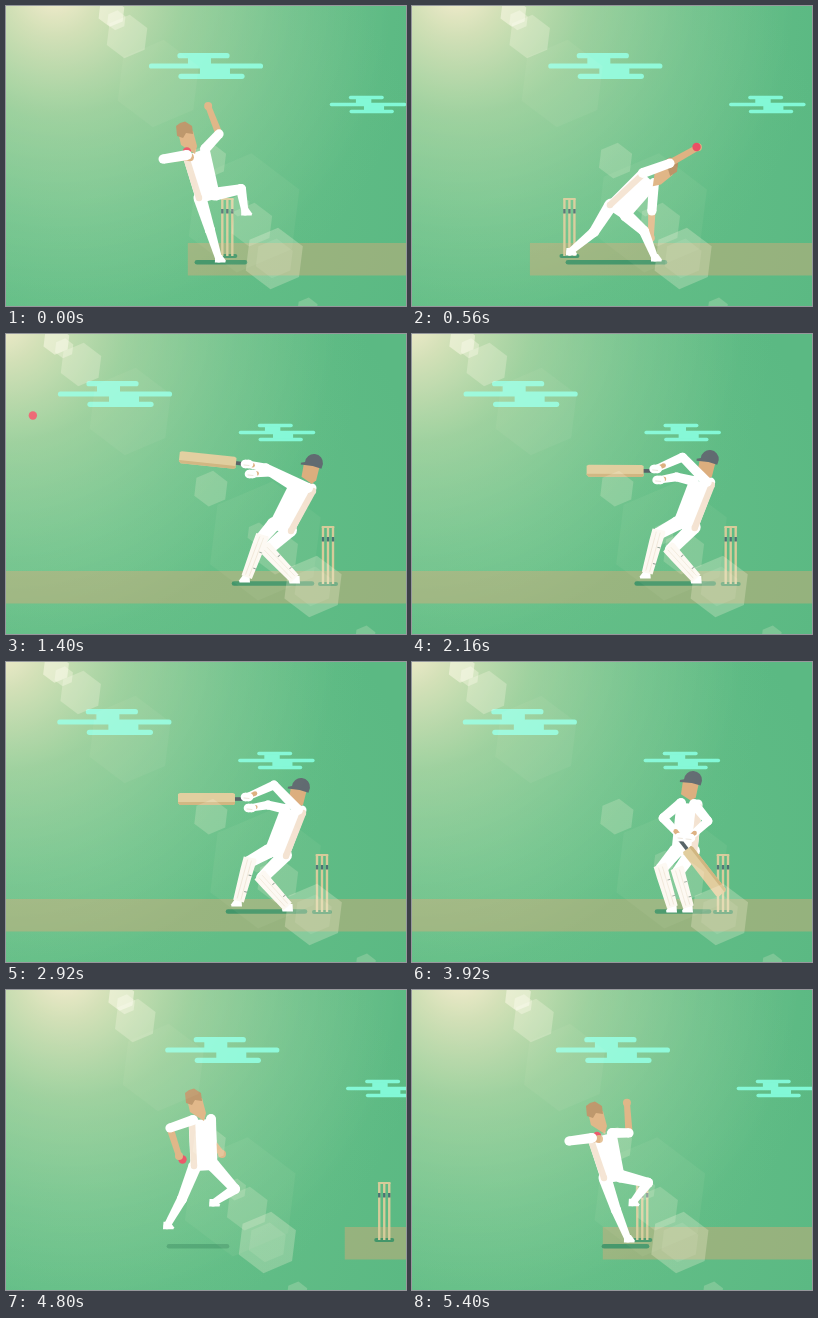
These frames come from a looping animation (400x300 px, 5440 ms). An HTML page with a canvas:

```html
<!DOCTYPE html>
<html lang="en">
<head>
<meta charset="utf-8">
<title>Cricket</title>
<style>
html, body { margin: 0; width: 100%; height: 100%; overflow: hidden; background: #66bf8e; }
canvas { display: block; width: 400px; height: 300px; }
</style>
</head>
<body>
<canvas id="stage"></canvas>
<script>
const LOOP = 5440, RELEASE = 560, HIT = 1250;
const SKIN = '#dcae7e', WHITE = '#ffffff', SHADE = '#f3e2d0', SHADOW = '#43966a';
const canvas = document.getElementById('stage');
const g = canvas.getContext('2d');
const scale = Math.max(1, window.devicePixelRatio || 1);
canvas.width = 400 * scale;
canvas.height = 300 * scale;

// Smooth curve through [time, values] keys, without overshoot.
function curve(keys) {
  const slope = (i, n) => (keys[i + 1][1][n] - keys[i][1][n]) / (keys[i + 1][0] - keys[i][0]);
  const last = keys.length - 1;
  function tangent(i, n) {
    if (i === 0) return slope(0, n);
    if (i === last) return slope(last - 1, n);
    const a = slope(i - 1, n), b = slope(i, n);
    return a * b <= 0 ? 0 : 2 * a * b / (a + b);
  }
  return t => {
    let i = 0;
    while (i < last - 1 && t >= keys[i + 1][0]) i++;
    const [t0, a] = keys[i], [t1, b] = keys[i + 1];
    const h = t1 - t0, u = Math.min(1, Math.max(0, (t - t0) / h)), w = 1 - u;
    return a.map((v, n) =>
      v * (1 + 2 * u) * w * w + b[n] * u * u * (3 - 2 * u) +
      h * u * w * (w * tangent(i, n) - u * tangent(i + 1, n)));
  };
}

function poses(keys) {
  const parts = Object.keys(keys[0][1]);
  const curves = parts.map(p => curve(keys.map(([t, pose]) => [t, pose[p]])));
  return t => Object.fromEntries(parts.map((p, i) => [p, curves[i](t)]));
}

// Screen x of the left end of the pitch.
const pitchX = curve([
  [0, 182], [200, 145], [400, 125], [560, 118], [700, 50], [900, -340], [1100, -645],
  [1240, -691], [1400, -693], [2920, -699], [3920, -704], [4080, -600], [4250, 0],
  [4400, 360], [4520, 412], [4800, 339], [5400, 191], [5440, 182]
].map(([t, x]) => [t, [x]]));

// Bowler; shadow is left, right, strength.
const strideA = {
  head: [187, 107], turn: [0], sh: [187, 130, 205, 129], hip: [189, 176, 207, 175],
  armA: [164, 138, 173, 166], armB: [206, 152, 216, 164],
  legA: [176, 209, 161, 236], legB: [229, 199, 207, 213],
  ball: [176.5, 169.5], shadow: [163, 221, .6]
};
const passA = {
  ...strideA, head: [187, 110], sh: [187, 133, 205, 132], hip: [189, 179, 207, 178],
  armA: [172, 153, 186, 175], armB: [209, 156, 220, 166],
  legA: [205, 214, 168, 218], legB: [212, 218, 212, 251], ball: [190, 177],
  shadow: [168, 220, 1]
};
const strideB = {
  ...strideA, armA: [176, 156, 203, 163], armB: [214, 153, 203, 168],
  legA: strideA.legB, legB: strideA.legA, ball: [206, 165]
};
const passB = { ...passA, legA: passA.legB, legB: passA.legA };
const plant = {
  ...strideA, head: [184, 115], sh: [181, 140, 203, 137], hip: [193, 187, 208, 186],
  armA: [160, 148, 182, 160], armB: [216, 150, 218, 136],
  legA: [219, 222, 239, 249], legB: [210, 220, 182, 232],
  ball: [182, 156], shadow: [192, 238, 1]
};
const gather = {
  head: [182, 120], turn: [0], sh: [180, 148, 200, 143], hip: [193, 188, 208, 186],
  armA: [157, 151, 187, 149], armB: [217, 143, 215, 113],
  legA: [204, 220, 216, 249], legB: [236, 193, 220, 213],
  ball: [185, 146], shadow: [192, 235, 1]
};
const leap = {
  head: [178, 124], turn: [0], sh: [181, 149, 199, 143], hip: [194, 192, 209, 188],
  armA: [157, 153, 184, 151], armB: [213, 128, 202, 100],
  legA: [204, 224, 213, 253], legB: [235, 183, 239, 206],
  ball: [181, 145], shadow: [191, 239, 1]
};
const drop = {
  head: [186, 124], turn: [4], sh: [184, 150, 204, 145], hip: [193, 195, 210, 193],
  armA: [169, 168, 168, 194], armB: [220, 124, 222, 97],
  legA: [195, 225, 187, 251], legB: [237, 193, 254, 222],
  ball: [168, 198], shadow: [180, 246, 1]
};
const windup = {
  head: [205, 126], turn: [12], sh: [198, 149, 218, 152], hip: [194, 197, 212, 201],
  armA: [177, 149, 155, 135], armB: [239, 148, 255, 162],
  legA: [186, 226, 167, 247], legB: [233, 218, 250, 252],
  ball: [151, 132], shadow: [162, 250, 1]
};
const over = {
  head: [232, 138], turn: [32], sh: [214, 153, 231, 162], hip: [197, 199, 213, 207],
  armA: [215, 124, 224, 97], armB: [245, 181, 248, 206],
  legA: [183, 228, 160, 246], legB: [232, 225, 247, 252],
  ball: [225, 93], shadow: [157, 252, 1]
};
const release = {
  head: [258, 160], turn: [65], sh: [231, 167, 242, 177], hip: [199, 199, 214, 209],
  armA: [258, 157, 286, 141], armB: [240, 205, 239, 232],
  legA: [182, 226, 158, 246], legB: [232, 225, 243, 252],
  ball: [283.5, 141], shadow: [156, 253, 1]
};
const follow = {
  ...release, head: [261, 170], turn: [80], sh: [232, 173, 242, 184],
  armA: [260, 186, 258, 213], armB: [226, 207, 216, 224]
};
const bowlerAt = poses([
  [0, leap], [140, drop], [300, windup], [430, over], [RELEASE, release], [740, follow],
  [3800, strideB], [4080, strideB], [4200, passB], [4320, strideA], [4440, passA],
  [4560, strideB], [4680, passB], [4800, strideA], [4920, passA], [5040, strideB],
  [5160, passB], [5290, plant], [5400, gather], [LOOP, leap]
]);

// Batter; coordinates hold when his wicket is at x = 316.
const ready = {
  head: [285, 122], turn: [0], sh: [273, 143, 293, 144], hip: [267, 189, 284, 190],
  armA: [271, 161, 290, 152], armB: [307, 157, 295, 144],
  legA: [246, 211, 244, 246], legB: [277, 214, 284, 247],
  bat: [298, 136, -65], shadow: [228, 303, 1]
};
const strike = {
  head: [289, 127], turn: [-3], sh: [272, 147, 294, 149], hip: [262, 192, 280, 196],
  armA: [258, 162, 246, 176], armB: [265, 164, 249, 172],
  legA: [247, 206, 233, 246], legB: [260, 216, 284, 247],
  bat: [239, 181, 135], shadow: [222, 300, 1]
};
const finish = {
  head: [302, 129], turn: [6], sh: [281, 152, 300, 154], hip: [262, 190, 278, 196],
  armA: [258, 138, 239, 140], armB: [254, 134, 235, 130],
  legA: [249, 205, 234, 245], legB: [255, 216, 284, 246],
  bat: [224, 129, 186], shadow: [222, 300, 1]
};
const hold = {
  head: [295, 125], turn: [6], sh: [279, 147, 296, 148], hip: [263, 189, 279, 193],
  armA: [262, 143, 244, 146], armB: [268, 123, 241, 135],
  legA: [243, 200, 232, 241], legB: [256, 216, 283, 246],
  bat: [229, 137, 180], shadow: [222, 299, 1]
};
const rest = {
  head: [286, 118], turn: [4], sh: [274, 141, 291, 142], hip: [269, 189, 286, 189],
  armA: [256, 156, 274, 175], armB: [301, 159, 282, 176],
  legA: [254, 207, 266, 247], legB: [271, 210, 282, 247],
  bat: [280, 187, 52], shadow: [250, 302, 1]
};
const batterAt = poses([
  [0, ready], [1100, ready], [HIT, strike], [1400, finish], [1560, finish],
  [2200, hold], [3000, hold], [3640, rest], [LOOP, rest]
]);

// Drawing helpers
function poly(color, ...p) {
  g.fillStyle = color;
  g.beginPath();
  for (let i = 0; i < p.length; i += 2) g.lineTo(p[i], p[i + 1]);
  g.closePath();
  g.fill();
}
function disc(color, x, y, r) {
  g.fillStyle = color;
  g.beginPath();
  g.arc(x, y, r, 0, 7);
  g.fill();
}
function line(color, width, x0, y0, x1, y1, cap = 'round') {
  g.strokeStyle = color;
  g.lineWidth = width;
  g.lineCap = cap;
  g.beginPath();
  g.moveTo(x0, y0);
  g.lineTo(x1, y1);
  g.stroke();
}
// Tapered limb with round ends.
function limb(color, x0, y0, r0, x1, y1, r1) {
  const a = Math.atan2(y1 - y0, x1 - x0) + Math.PI / 2;
  const c = Math.cos(a), s = Math.sin(a);
  poly(color, x0 + c * r0, y0 + s * r0, x1 + c * r1, y1 + s * r1,
    x1 - c * r1, y1 - s * r1, x0 - c * r0, y0 - s * r0);
  disc(color, x0, y0, r0);
  disc(color, x1, y1, r1);
}
function at(x, y, degrees, draw) {
  g.save();
  g.translate(x, y);
  g.rotate(degrees * Math.PI / 180);
  draw();
  g.restore();
}

function hexagon(x, y, r, alpha) {
  const p = [];
  for (let i = 0; i < 6; i++) {
    const a = -.4 + i * Math.PI / 3;
    p.push(x + r * Math.cos(a), y + r * Math.sin(a));
  }
  poly(`rgba(255,226,184,${alpha})`, ...p);
}

function glow(x, y, r, stops) {
  const fill = g.createRadialGradient(x, y, 0, x, y, r);
  stops.forEach(([p, c]) => fill.addColorStop(p, c));
  g.fillStyle = fill;
  g.fillRect(0, 0, 400, 300);
}

function background(sun) {
  g.fillStyle = '#5bb983';
  g.fillRect(0, 0, 400, 300);
  glow(90, 190, 330, [[0, 'rgba(112,198,142,.6)'], [1, 'rgba(112,198,142,0)']]);
  glow(sun - 55, -18, 370, [
    [0, 'rgba(244,230,194,1)'], [.13, 'rgba(216,220,174,.8)'],
    [.35, 'rgba(164,208,152,.55)'], [.65, 'rgba(132,202,146,.28)'],
    [1, 'rgba(120,200,142,0)']]);
}

// Light that brightens everything below it.
function sunlight(sun) {
  g.globalCompositeOperation = 'screen';
  glow(sun - 45, -18, 330, [
    [0, 'rgba(255,222,170,.34)'], [.4, 'rgba(255,222,170,.19)'], [1, 'rgba(255,222,170,0)']]);
  const cx = 201, cy = 151, dx = cx - sun, dy = cy - 4;
  const spots = [[-.5, 44, .05], [.38, 60, .05], [-.98, 14, .5], [-.93, 10, .36], [-.82, 22, .27],
    [.025, 18, .2], [.33, 11, .17], [.46, 22, .18], [.69, 31, .26], [.69, 20, .1], [1.03, 11, .2]];
  for (const [k, r, a] of spots) hexagon(cx + k * dx, cy + k * dy, r, a);
  g.globalCompositeOperation = 'source-over';
}

function cloud(x, y, s) {
  g.save();
  g.translate(x, y);
  g.scale(s, s);
  const c = '#82f8d6';
  line(c, 5.2, -26, -10.3, 21, -10.3);
  line(c, 5.2, -54.5, 0, 54.5, 0);
  line(c, 5.2, -25, 10.3, 36, 10.3);
  g.fillStyle = c;
  g.fillRect(-18, -9, 23, 8);
  g.fillRect(-6, 1, 30, 8);
  g.restore();
}

function wicket(x) {
  line(SHADOW, 4, x - 8, 250, x + 8, 250);
  for (const d of [-5, 0, 5]) {
    line('#d6cb9a', 2.4, x + d, 193, x + d, 250, 'butt');
    line('#4c7272', 2.4, x + d, 203, x + d, 207.5, 'butt');
  }
  line('#d6cb9a', 2, x - 5.5, 193, x + 5.5, 193);
}

function groundShadow(y, [x0, x1, strength]) {
  g.globalAlpha = strength;
  line(SHADOW, 4.6, x0, y, x1, y);
  g.globalAlpha = 1;
}

function torso(p, shadeRight) {
  const [ax, ay, bx, by] = p.sh, [cx, cy, dx, dy] = p.hip;
  poly(WHITE, ax, ay, bx, by, dx, dy, cx, cy);
  limb(WHITE, ax, ay, 4.5, cx, cy, 4.5);
  limb(WHITE, bx, by, 4.5, dx, dy, 4.5);
  limb(WHITE, cx, cy, 5, dx, dy, 5);
  if (shadeRight) limb(SHADE, bx + 1, by + 3, 3.2, dx + 1, dy + 1, 3.2);
  else limb(SHADE, ax - 1, ay + 2, 3.2, cx - 1, cy, 3.2);
}

function shoe(x, y, dir) {
  poly(WHITE, x - 3.5 * dir, y - 4, x + 3 * dir, y - 4, x + 7 * dir, y + 1.5,
    x + 6.5 * dir, y + 3.5, x - 4 * dir, y + 3.5);
}

function bowlerLeg(x, y, [kx, ky, fx, fy]) {
  limb(WHITE, x, y, 6.5, kx, ky, 5);
  limb(WHITE, kx, ky, 5, fx, fy, 3.4);
  shoe(fx, fy, 1);
}

function bowlerArm(x, y, [ex, ey, hx, hy]) {
  limb(SKIN, ex, ey, 3.6, hx, hy, 3);
  disc(SKIN, hx, hy, 4);
  limb(WHITE, x, y, 5, ex, ey, 4.6);
}

function ball(x, y) {
  disc('#e9485f', x, y, 4.2);
}

function bowler(p, holding) {
  const [ax, ay, bx, by] = p.sh, [cx, cy, dx, dy] = p.hip;
  groundShadow(256.3, p.shadow);
  bowlerArm(bx, by, p.armB);
  bowlerLeg(dx, dy, p.legB);
  bowlerLeg(cx, cy, p.legA);
  torso(p, false);
  at(...p.head, p.turn[0], () => {
    poly(SKIN, -6, 2, 9, 1, 13, 16, 11, 24, -3, 15);
    poly('#b48a5e', -8, -4, -4, -7, 1, -8.5, 8, -4, 9, 4, 2, 3, -1, 8, -7, 6);
  });
  if (holding) ball(...p.ball);
  bowlerArm(ax, ay, p.armA);
  if (holding && p.turn[0] > 20) ball(...p.ball);
}

function batterLeg(x, y, [kx, ky, fx, fy]) {
  limb(WHITE, x, y, 7, kx, ky, 6);
  shoe(fx, fy, -1);
  const a = Math.atan2(fy - ky, fx - kx), len = Math.hypot(fx - kx, fy - ky);
  at(kx, ky, a * 180 / Math.PI, () => {
    poly('#fcf8f0', -5, -6, -3, -7, 8, -6.5, len - 2, -5.5, len - 2, 5.5, 8, 6.5, -4, 6.5);
    for (const d of [-2, 2]) line('#eee4d6', .8, -2, d, len - 4, d, 'butt');
    for (const k of [.3, .7]) line('#8b9a91', 1, len * k, -6, len * k, -3, 'butt');
  });
}

function batterArm(x, y, [ex, ey, hx, hy]) {
  limb(WHITE, x, y, 5, ex, ey, 4.4);
  limb(WHITE, ex, ey, 4.4, hx, hy, 3.6);
  const mx = hx + (ex - hx) * .3, my = hy + (ey - hy) * .3;
  limb(SKIN, mx, my, 2.2, hx, hy, 2.2);
}

function bat([x, y, angle]) {
  at(x, y, angle, () => {
    line('#4f5c62', 3.6, -16, 0, 1, 0, 'butt');
    poly('#dfcb9a', 0, -5, 2, -6, 55, -6, 57, -4, 57, 5, 55, 6, 2, 6, 0, 5);
    poly('#cdb27c', 0, -5, 2, -6, 55, -6, 57, -4, 57, -3, 0, -3);
  });
}

function batter(p) {
  const [ax, ay, bx, by] = p.sh, [cx, cy, dx, dy] = p.hip;
  groundShadow(249.5, p.shadow);
  batterLeg(dx, dy, p.legB);
  batterLeg(cx, cy, p.legA);
  torso(p, true);
  at(...p.head, p.turn[0], () => {
    poly(SKIN, -10, 2, 6, 3, 4, 17, 0, 21, -11, 15);
    g.fillStyle = '#616b71';
    g.beginPath();
    g.arc(0, 0, 9, Math.PI, 0);
    g.lineTo(8, 5);
    g.lineTo(-1, 3);
    g.lineTo(-13, 3);
    g.lineTo(-13, 1);
    g.lineTo(-9, 0);
    g.fill();
  });
  batterArm(bx - 4, by, p.armB);
  batterArm(ax, ay, p.armA);
  bat(p.bat);
  for (const [, , x, y] of [p.armA, p.armB]) {
    limb(WHITE, x - 2, y, 4.3, x + 2, y, 4.3);
    line('#e6ddd0', .8, x - 3, y + 1, x + 2, y + 1.5);
  }
}

function flyingBall(t, px) {
  const bounce = 1050;
  if (t < RELEASE || t > 1450) return;
  if (t < bounce) {
    const u = (t - RELEASE) / (bounce - RELEASE);
    ball(px + 165.5 + 560 * u, 141 + 30 * u + 70 * u * u);
  } else if (t < HIT) {
    const u = (t - bounce) / (HIT - bounce);
    ball(px + 725.5 + 165 * u, 241 - 75 * u + 15 * u * u);
  } else {
    const u = (t - HIT) / 150;
    ball(199 - 171 * u, 181 - 112 * u + 13 * u * u);
  }
}

function shifted(dx, draw) {
  if (Math.abs(dx) > 420) return;
  g.save();
  g.translate(dx, 0);
  draw();
  g.restore();
}

function render(t) {
  const px = pitchX(t)[0];
  const drift = (px - 182) * .104;
  const sun = 103.5 + drift * .617;
  g.setTransform(scale, 0, 0, scale, 0, 0);
  background(sun);
  cloud(200 + drift, 60, 1);
  cloud(362 + drift, 98.5, .67);
  g.fillStyle = 'rgba(194,174,122,.56)';
  g.fillRect(px, 237, 1400, 32.5);
  wicket(px + 39.5);
  wicket(px + 1015);

  let run = 0;
  if (t > RELEASE && t < 3000) run = px - 118;
  else if (t >= 3000 && t < 4520) run = px - 412;
  shifted(run, () => bowler(bowlerAt(t), t < RELEASE || t > 3000));
  shifted(px + 699, () => batter(batterAt(t)));
  flyingBall(t, px);
  sunlight(sun);
}

const start = performance.now();
function tick() {
  render((performance.now() - start) % LOOP);
  requestAnimationFrame(tick);
}
tick();
</script>
</body>
</html>
```
